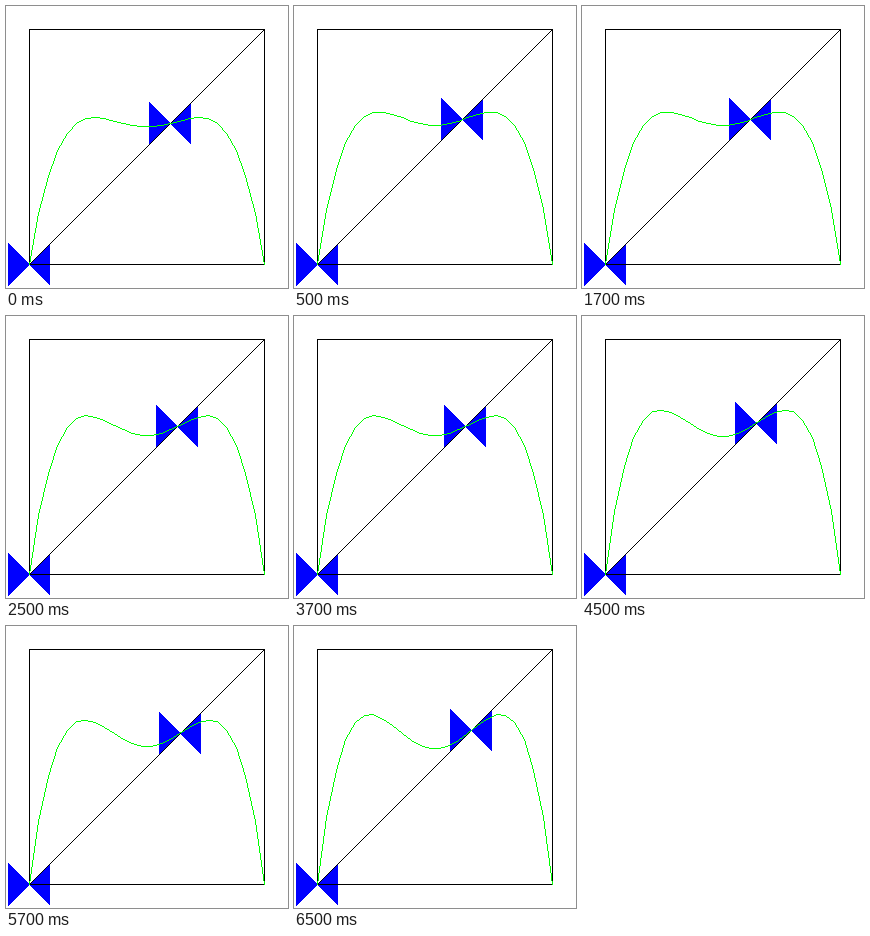
These frames come from a looping animation (282x282 px, 8 s). An HTML page with a canvas:

```html
<!DOCTYPE html>
<html lang="en">
<head>
<meta charset="utf-8">
<title>Second iterate of the logistic map</title>
<style>
  html, body { margin: 0; width: 100%; height: 100%; overflow: hidden; background: #fff; }
  canvas { display: block; width: 282px; height: 282px; image-rendering: pixelated; }
</style>
</head>
<body>
<canvas id="plot" width="282" height="282"></canvas>
<script>
const ctx = document.getElementById('plot').getContext('2d');
const LEFT = 23, BOTTOM = 258, SIDE = 235, SEGMENTS = 25, HALF = 21;
const LOOP = 8000, HOLD = 2000, FIRST_HOLD = 500;

const px = x => Math.round(LEFT + x * SIDE);
const py = y => Math.round(BOTTOM - y * SIDE);

// One-pixel line without antialiasing
function line(x0, y0, x1, y1, color) {
  ctx.fillStyle = color;
  const n = Math.max(Math.abs(x1 - x0), Math.abs(y1 - y0));
  for (let i = 0; i <= n; i++) {
    const k = n ? i / n : 0;
    ctx.fillRect(Math.round(x0 + (x1 - x0) * k), Math.round(y0 + (y1 - y0) * k), 1, 1);
  }
}

// Two triangles meeting at a fixed point
function bowtie(p) {
  const cx = px(p), cy = py(p);
  ctx.fillStyle = '#00f';
  for (let d = 1; d <= HALF; d++) {
    ctx.fillRect(cx - d, cy - d, 1, 2 * d + 1);
    if (d < HALF) ctx.fillRect(cx + d, cy - d, 1, 2 * d + 1);
  }
}

function draw(r) {
  const logistic = x => r * x * (1 - x);
  ctx.fillStyle = '#fff';
  ctx.fillRect(0, 0, 282, 282);

  bowtie(0);
  bowtie(1 - 1 / r);

  const right = LEFT + SIDE, top = BOTTOM - SIDE;
  line(LEFT, top, right, top, '#000');
  line(LEFT, BOTTOM, right, BOTTOM, '#000');
  line(LEFT, top, LEFT, BOTTOM, '#000');
  line(right, top, right, BOTTOM, '#000');
  line(LEFT, BOTTOM, right, top, '#000');

  let x0 = LEFT, y0 = BOTTOM;
  for (let i = 1; i <= SEGMENTS; i++) {
    const x = i / SEGMENTS;
    const x1 = px(x), y1 = py(logistic(logistic(x)));
    line(x0, y0, x1, y1, '#0f0');
    x0 = x1;
    y0 = y1;
  }
}

let shown = -1;
function frame() {
  const t = performance.now() % LOOP;
  const step = Math.floor((t + HOLD - FIRST_HOLD) / HOLD);
  if (step !== shown) {
    shown = step;
    draw(2.5 + step / 10);
  }
  requestAnimationFrame(frame);
}
frame();
</script>
</body>
</html>
```
